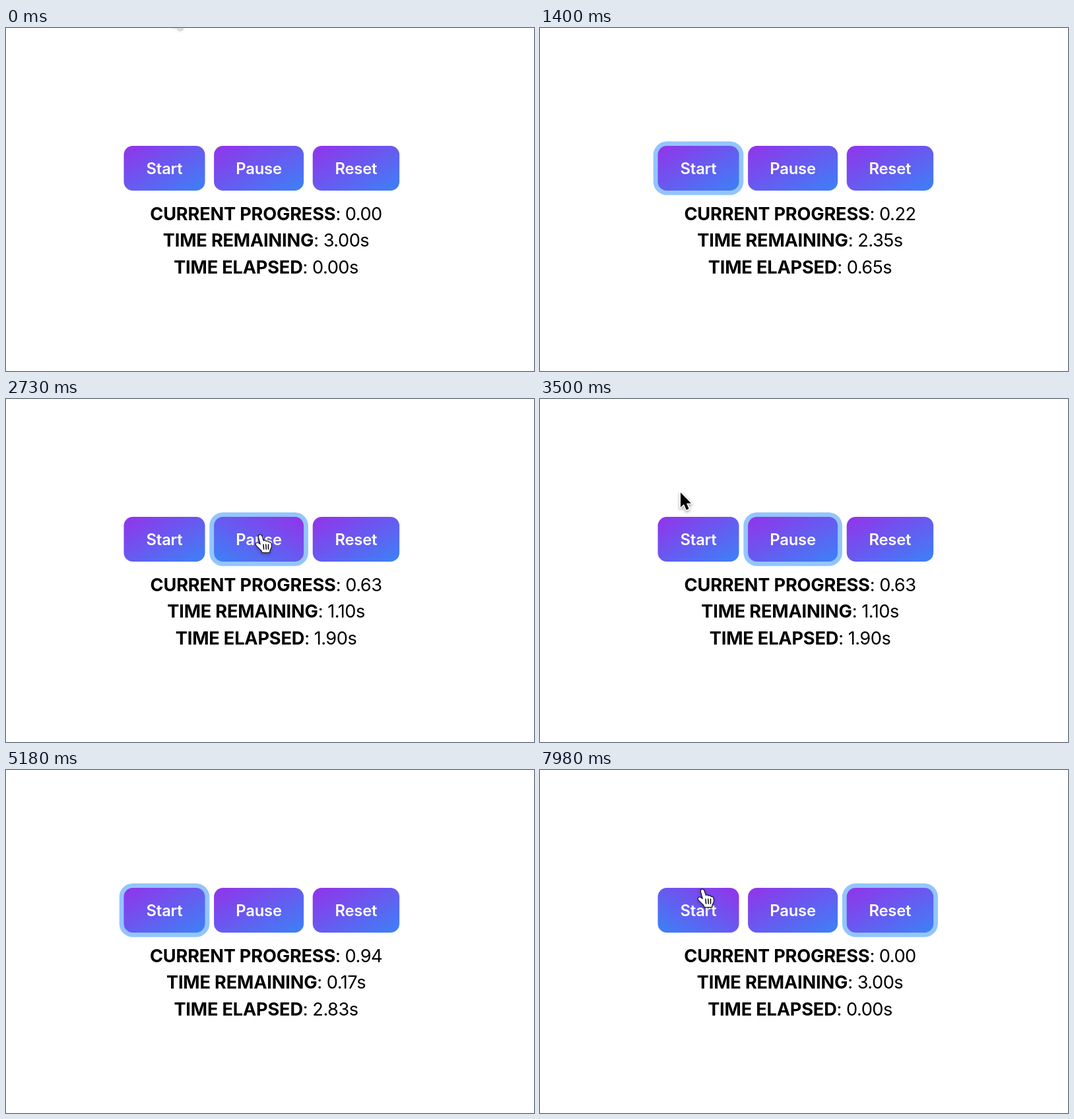
These frames come from a looping animation (800x521 px, 8 s). An HTML page with a canvas:

```html
<!DOCTYPE html>
<html lang="en">
<head>
<meta charset="utf-8">
<title>Countdown controls</title>
<style>
  html, body { margin: 0; width: 100%; height: 100%; overflow: hidden; background: #fff; }
  canvas { display: block; }
</style>
</head>
<body>
<canvas id="stage" width="800" height="521"></canvas>
<script>
const ctx = document.getElementById('stage').getContext('2d');
const LOOP = 8000, STEP = 70, TICK = 1 / 15, DURATION = 3;
const FONT = 'Inter, "Liberation Sans", sans-serif';
const CENTER = 394, LEFT = 178.5, TOP = 179, HEIGHT = 68;
const GAP = 13.6, RADIUS = 13.6, RING = 6.8, PRESS_Y = 207;

// Moments of the clicks, in steps
const START = 10.25, PAUSE = 38.75, RESUME = 60.05, RESET = 100.5;

const buttons = [
  { label: 'Start', w: 123 },
  { label: 'Pause', w: 136 },
  { label: 'Reset', w: 131.4 }
];
buttons.reduce((x, b) => (b.x = x) + b.w + GAP, LEFT);

// The pointer rests at each stop; it reaches the next along an arc of height `lift`
const press = (click, x, lift) => ({ x, y: PRESS_Y, from: click - 3, to: click + 2, lift });
const stops = [
  { x: 254, y: -26, from: 0, to: 0 },
  press(START, 245, 0),
  press(PAUSE, 385, 700),
  { x: 213, y: 142, from: 50, to: 51, lift: 20 },
  press(RESUME, 246, 90),
  press(RESET, 540, 700),
  { x: 246, y: 182, from: 112, to: 115, lift: 205 }
];

function pointerAt(n) {
  const i = stops.findIndex(s => n <= s.to);
  const b = stops[i], a = stops[i - 1];
  if (n >= b.from) return b;
  const k = (n - a.to) / (b.from - a.to);
  return {
    x: a.x + (b.x - a.x) * k,
    y: a.y + (b.y - a.y) * k - b.lift * Math.sin(Math.PI * k)
  };
}

function elapsedAt(n) {
  if (n < START || n >= RESET) return 0;
  const steps = Math.min(n, PAUSE) - START + Math.max(0, n - RESUME);
  return Math.min(DURATION, steps * TICK);
}

function focusAt(n) {
  if (n < START) return -1;
  if (n >= RESET) return 2;
  return n >= PAUSE && n < RESUME ? 1 : 0;
}

const isOver = (b, p) => p.x >= b.x && p.x <= b.x + b.w && p.y >= TOP && p.y <= TOP + HEIGHT;

function box(x, y, w, h, r, fill) {
  ctx.beginPath();
  ctx.roundRect(x, y, w, h, r);
  ctx.fillStyle = fill;
  ctx.fill();
}

// Corner-to-corner gradient, mirrored on hover
function gradient(b, hover) {
  const d = b.w * HEIGHT / (b.w * b.w + HEIGHT * HEIGHT);
  const dx = HEIGHT * d * (hover ? -1 : 1), dy = b.w * d;
  const cx = b.x + b.w / 2, cy = TOP + HEIGHT / 2;
  const g = ctx.createLinearGradient(cx - dx, cy - dy, cx + dx, cy + dy);
  g.addColorStop(0, '#9333ea');
  g.addColorStop(1, '#3b82f6');
  return g;
}

function setFont(weight, size, spacing) {
  ctx.font = `${weight} ${size}px ${FONT}`;
  ctx.letterSpacing = spacing + 'px';
}

function drawButton(b, hover, focus) {
  if (focus) {
    box(b.x - RING, TOP - RING, b.w + 2 * RING, HEIGHT + 2 * RING, RADIUS + RING, '#93c5fd');
  }
  box(b.x, TOP, b.w, HEIGHT, RADIUS, gradient(b, hover));
  setFont(600, 23.8, -0.2);
  ctx.textAlign = 'center';
  ctx.fillStyle = '#fff';
  ctx.fillText(b.label, b.x + b.w / 2, 221.8);
}

function drawLine(title, value, row) {
  const parts = [[title, 700, -0.2], [': ' + value, 400, -0.5]];
  const widths = parts.map(([text, weight, spacing]) => {
    setFont(weight, 27.2, spacing);
    return ctx.measureText(text).width;
  });
  let x = CENTER - (widths[0] + widths[1]) / 2;
  ctx.textAlign = 'left';
  ctx.fillStyle = '#000';
  parts.forEach(([text, weight, spacing], i) => {
    setFont(weight, 27.2, spacing);
    ctx.fillText(text, x, 291.6 + row * 40.8);
    x += widths[i];
  });
}

const arrow = new Path2D('M0 0V22.5L5 17.8L8.8 26.5L12.6 24.8L9 16.4H16Z');
const hand = new Path2D('M-2.2 2C-2.6-.8 1.5-1.4 2.4 1.2L5 9C6.5 7.6 8.4 8.2 9 9.8' +
  'C10.4 8.6 12.4 9.2 13 11C14.6 10.2 16.2 11 16.6 13C17.4 17 16.6 19.5 14.6 22.5L14 26H3.6' +
  'C3 22.5-2.5 19-6 14.5C-7.2 12.4-5 10.6-2.8 12L1 14.6Z');
const folds = new Path2D('M5 14L5.6 21M8.8 14L9.2 21M12.5 14V21');

function drawPointer(p, onButton) {
  const shape = onButton ? hand : arrow;
  ctx.save();
  ctx.translate(p.x, p.y);
  ctx.lineJoin = ctx.lineCap = 'round';
  ctx.lineWidth = onButton ? 2 : 3;
  ctx.strokeStyle = onButton ? '#000' : '#fff';
  ctx.fillStyle = onButton ? '#fff' : '#000';
  ctx.shadowColor = 'rgba(0,0,0,.4)';
  ctx.shadowBlur = 4;
  ctx.shadowOffsetY = 2;
  ctx.stroke(shape);
  ctx.shadowColor = 'transparent';
  ctx.fill(shape);
  if (onButton) {
    ctx.lineWidth = 1.5;
    ctx.stroke(folds);
  }
  ctx.restore();
}

function draw(time) {
  const n = Math.floor((time % LOOP) / STEP);
  const p = pointerAt(n), focus = focusAt(n), elapsed = elapsedAt(n);
  ctx.fillStyle = '#fff';
  ctx.fillRect(0, 0, 800, 521);
  buttons.forEach((b, i) => drawButton(b, isOver(b, p), i === focus));
  drawLine('CURRENT PROGRESS', (elapsed / DURATION).toFixed(2), 0);
  drawLine('TIME REMAINING', (DURATION - elapsed).toFixed(2) + 's', 1);
  drawLine('TIME ELAPSED', elapsed.toFixed(2) + 's', 2);
  drawPointer(p, buttons.some(b => isOver(b, p)));
}

let origin;
function loop(now) {
  origin ??= now;
  draw(Math.max(0, now - origin));
  requestAnimationFrame(loop);
}
draw(0);
requestAnimationFrame(loop);
</script>
</body>
</html>
```
